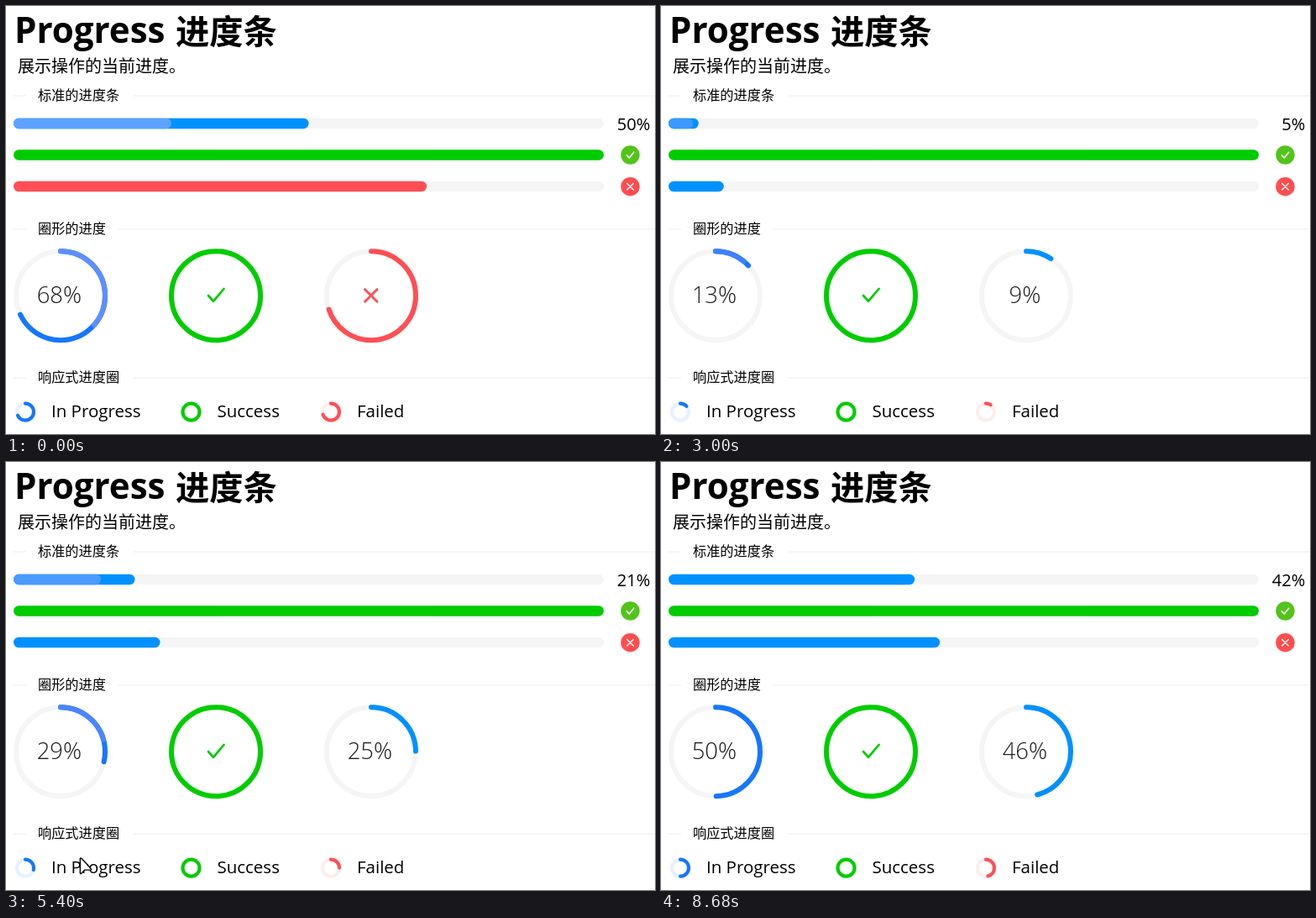
Recreate the animation shown at these times as an HTML page. Size 773 by 510 pixels, loop 8760 ms.

```html
<!DOCTYPE html>
<html lang="zh">
<head>
<meta charset="utf-8">
<title>Progress</title>
<style>
html, body { margin: 0; width: 100%; height: 100%; overflow: hidden; background: #fff; }
svg { display: block; width: 773px; height: 510px; }
text { font-family: "Open Sans", "Noto Sans CJK SC", "Noto Sans CJK", sans-serif; fill: #000; }
.title { font-weight: 700; }
.big { font-size: 27.4px; font-weight: 300; text-anchor: middle; fill: #1a1a1a; }
.label { font-size: 20.5px; }
.rate { font-size: 20.1px; text-anchor: end; }
.head { font-size: 16.2px; }
</style>
</head>
<body>
<svg id="stage" viewBox="0 0 773 510"></svg>
<script>
const NS = "http://www.w3.org/2000/svg";
const stage = document.getElementById("stage");
const LOOP = 8760, RATE = 0.006445;
const BAR_X = 9, BAR_W = 703, BAR_H = 12.4;
const GREEN = "#00cc00", RED = "#ff4f55", BLUE = "#0091ff", DEEP = "#1677ff", TRACK = "#f5f5f5";
const START = { ring: 955, red: 1550, bar: 2212 };

function add(tag, attrs, content) {
  const el = document.createElementNS(NS, tag);
  for (const k in attrs) el.setAttribute(k, attrs[k]);
  if (content) el.textContent = content;
  stage.appendChild(el);
  return el;
}
const set = (el, attrs) => { for (const k in attrs) el.setAttribute(k, attrs[k]); };
const show = (el, on) => el.setAttribute("visibility", on ? "visible" : "hidden");

const label = (x, y, cls, str) => add("text", { x, y, class: cls }, str);
const line = (d, stroke, width) =>
  add("path", { d, stroke, "stroke-width": width, fill: "none", "stroke-linecap": "round", "stroke-linejoin": "round" });

function bar(y, fill, pct = 100) {
  return add("rect", { x: BAR_X, y: y - BAR_H / 2, height: BAR_H, rx: BAR_H / 2, width: BAR_W * pct / 100, fill });
}
function setBar(el, pct, fill) {
  show(el, pct > 0);
  set(el, { width: Math.max(BAR_H, BAR_W * pct / 100), fill });
}

function ring(cx, cy, r, width, stroke) {
  return add("circle", { cx, cy, r, fill: "none", stroke, "stroke-width": width });
}
function arc(cx, cy, r, width, stroke) {
  const el = ring(cx, cy, r, width, stroke);
  set(el, { pathLength: 100, "stroke-linecap": "round", transform: `rotate(-90 ${cx} ${cy})` });
  return el;
}
function setArc(el, pct, stroke) {
  show(el, pct > 0);
  set(el, { "stroke-dasharray": `${pct} 200`, stroke });
}

// White blended over a colour in linear light
function lighten(rgb, a) {
  const mix = c => Math.round(255 * Math.pow(Math.pow(c / 255, 2.2) * (1 - a) + a, 1 / 2.2));
  return `rgb(${rgb.map(mix)})`;
}

function heading(y, str, resume) {
  label(38, y + 4.9, "head", str);
  add("path", { d: `M9 ${y}H24M${resume} ${y}H773`, stroke: "#f3f3f3", "stroke-width": 1.6 });
}

// Titles
set(label(10, 44, "title", "Progress"), { "font-size": 42.1 });
set(label(202, 45, "title", "进度条"), { "font-size": 40.3 });
set(label(14, 79, "", "展示操作的当前进度。"), { "font-size": 20 });
heading(107, "标准的进度条", 152);
heading(266, "圈形的进度", 134);
heading(443, "响应式进度圈", 152);

// Bars
[140, 177.5, 215].forEach(y => bar(y, TRACK));
const bar1 = bar(140, BLUE), glow1 = bar(140, BLUE);
bar(177.5, GREEN);
const bar3 = bar(215, RED);
const pct1 = label(767.2, 148, "rate", "");
add("circle", { cx: 743.5, cy: 177.5, r: 11.2, fill: "#52c41a" });
line("M739.3 177.8L742.3 181L747.8 174.3", "#fff", 1.7);
add("circle", { cx: 743.5, cy: 215.2, r: 11.2, fill: "#ff4d4f" });
line("M739.7 211.4L747.3 219M747.3 211.4L739.7 219", "#fff", 1.4);

// Large rings
const RY = 345.2, RR = 53, RW = 6;
ring(65, RY, RR, RW, TRACK);
ring(435, RY, RR, RW, TRACK);
ring(250, RY, RR, RW, GREEN);
const arc1 = arc(65, RY, RR, RW, DEEP), glow2 = arc(65, RY, RR, RW, DEEP);
const arc3 = arc(435, RY, RR, RW, RED);
const pct2 = label(63.4, 353.5, "big", ""), pct3 = label(433.4, 353.5, "big", "");
line("M241 345L247 351.8L259.5 337", GREEN, 2.7);
const cross = line("M427.5 337.7L442 352.2M442 337.7L427.5 352.2", RED, 3);

// Small rings
const MY = 483.7, MR = 10, MW = 4.2;
ring(23, MY, MR, MW, "#e8f1ff");
ring(387, MY, MR, MW, "#fdeeec");
ring(220.5, MY, MR, MW, GREEN);
const mini1 = arc(23, MY, MR, MW, DEEP), mini3 = arc(387, MY, MR, MW, RED);
label(54, 489.5, "label", "In Progress");
label(251.5, 489.5, "label", "Success");
label(418, 489.5, "label", "Failed");

// Pointer: each leg is a list of [time, x, y]
const legs = [
  [[320, 318, 150], [640, 110, 440], [760, 60, 481], [920, 60, 375]],
  [[1000, 90, 365], [1440, 430, 350]],
  [[1640, 450, 335], [1800, 490, 260], [2000, 330, 150], [2080, 307, 142], [2220, 304, 140]],
  [[4960, 96, 512], [5240, 90, 480], [5400, 87.5, 471.5], [5640, 88, 474], [6040, 96, 514]]
];
const pointer = add("path", {
  d: "M.8 1.2V18Q.8 20 2.4 18.6L6.4 14.6H13Q15 14.4 13.6 13L2.4 .8Q1 0 .8 1.2Z",
  fill: "#fff", stroke: "#000", "stroke-width": 1.4, "stroke-linejoin": "round"
});
function movePointer(t) {
  const leg = legs.find(l => t >= l[0][0] && t < l[l.length - 1][0]);
  show(pointer, !!leg);
  if (!leg) return;
  const i = leg.findIndex(p => p[0] > t), [ta, xa, ya] = leg[i - 1], [tb, xb, yb] = leg[i];
  const k = (t - ta) / (tb - ta);
  set(pointer, { transform: `translate(${xa + (xb - xa) * k} ${ya + (yb - ya) * k})` });
}

const value = (t, start, rest) => t < start ? rest : (t - start) * RATE;
const percent = v => Math.round(v) + "%";

function draw(t) {
  const a = value(t, START.bar, 50), b = value(t, START.ring, 68), c = value(t, START.red, 70);
  const failed = t < START.red, hue = failed ? RED : BLUE;
  const sweep = ((t + 833) % 2555) / 1560;
  const lit = sweep < 1, alpha = 60 / 255 * (1 - sweep);

  setBar(bar1, a, BLUE);
  setBar(bar3, c, hue);
  setArc(arc1, b, DEEP);
  setArc(arc3, c, hue);
  setArc(mini1, b, DEEP);
  setArc(mini3, c, RED);
  setBar(glow1, lit ? a * sweep : 0, lighten([0, 145, 255], lit ? alpha : 0));
  setArc(glow2, lit ? b * sweep : 0, lighten([22, 119, 255], lit ? alpha : 0));

  pct1.textContent = percent(a);
  pct2.textContent = percent(b);
  pct3.textContent = failed ? "" : percent(c);
  show(cross, failed);
  movePointer(t);
}

const origin = performance.now();
function tick() {
  draw((performance.now() - origin) % LOOP);
  requestAnimationFrame(tick);
}
draw(0);
requestAnimationFrame(tick);
</script>
</body>
</html>
```
